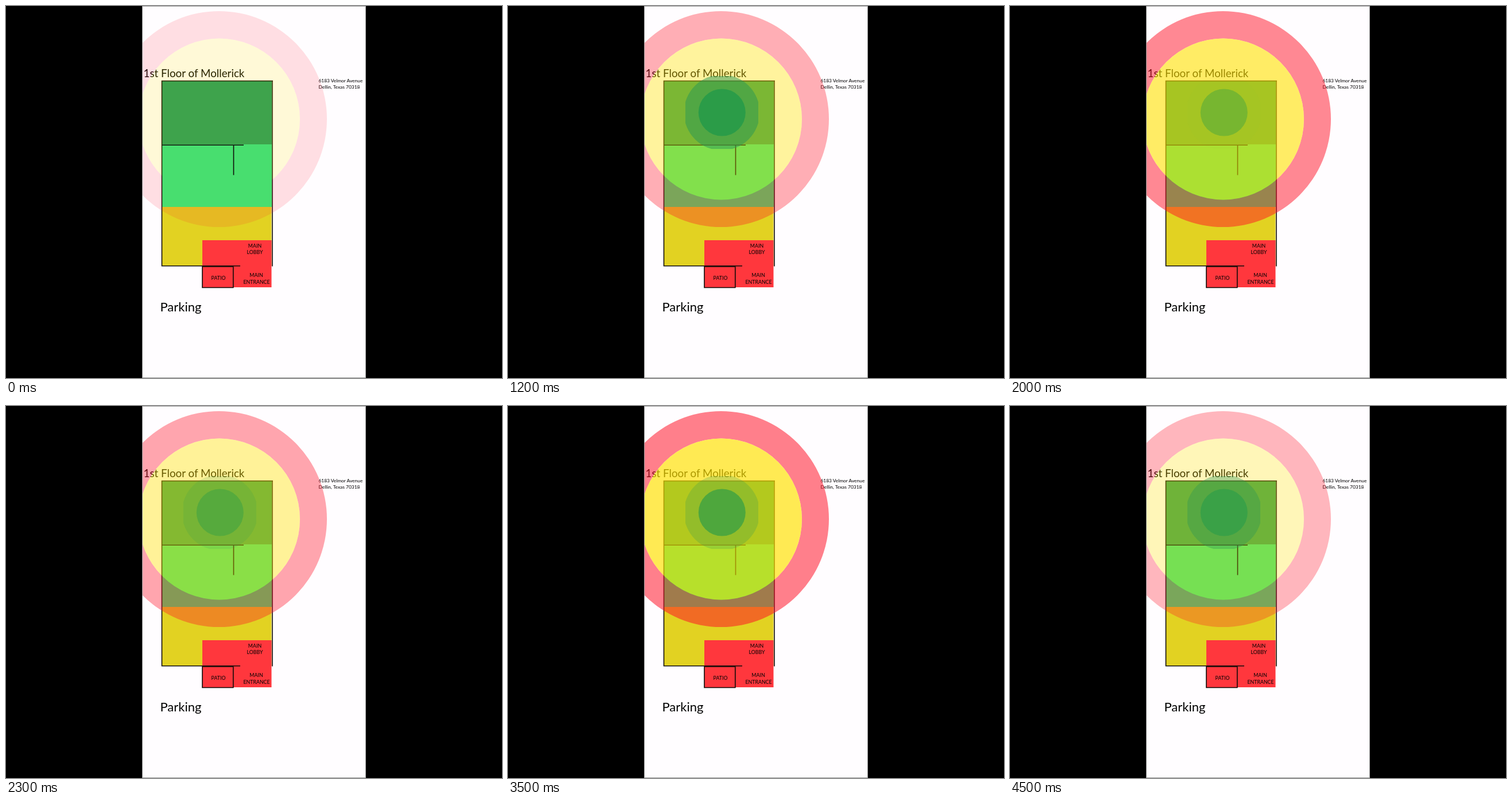
Animation, 864 px wide and 648 px high, one loop 4600 ms. Source, as an HTML page:

```html
<!DOCTYPE html>
<html lang="en">
<head>
<meta charset="utf-8">
<title>Floor plan signal</title>
<style>
  html, body { margin: 0; width: 100%; height: 100%; overflow: hidden; background: #000; }
  svg { display: block; width: 864px; height: 648px; }
  text { font-family: Lato, "Open Sans", sans-serif; fill: #000; }
  .label { font-size: 8.8px; text-anchor: middle; }
  .address { font-size: 8.4px; }
  .walls { fill: none; stroke: #100b08; stroke-width: 1.6; }
</style>
</head>
<body>
<svg viewBox="0 0 864 648">
  <defs>
    <clipPath id="floorArea"><path d="M272 131H463V350H272Z"/></clipPath>
    <clipPath id="outerArea"><path clip-rule="evenodd" d="M238 1H626V647H238Z M272 131H463V350H272Z"/></clipPath>
    <clipPath id="haloArea"><path d="M309 122H436V249H309Z"/></clipPath>
    <path id="ring" fill="#ff1226" fill-rule="evenodd"
      d="M183 197a188 188 0 0 1 376 0a188 188 0 0 1 -376 0Z M231 197a140.5 140.5 0 0 1 281 0a140.5 140.5 0 0 1 -281 0Z"/>
    <circle id="disc" cx="371.5" cy="197" r="140.5" fill="#ffe100"/>
  </defs>

  <path d="M237 0H627V648H237Z" fill="#999"/>
  <path d="M238 1H626V647H238Z" fill="#fffdff"/>

  <path d="M272 131H463V241H272Z" fill="#3ea34c"/>
  <path d="M272 241H463V350H272Z" fill="#48de6f"/>
  <path d="M272 350H462.5V453H272Z" fill="#e2d222"/>
  <path d="M342 408H462.5V490H342Z" fill="#ff373d"/>

  <g class="walls">
    <path d="M408 452.8H271.5V130.5H465M464 130.5V453.5M271.5 242.3H414M396.5 242V294.5"/>
    <path d="M342 454H395.8V490.5H342Z"/>
  </g>

  <text x="239.5" y="123.7" font-size="18.8">1st Floor of Mollerick</text>
  <text x="268.5" y="531.5" font-size="22">Parking</text>
  <text class="address" x="544.5" y="133">6183 Velmor Avenue</text>
  <text class="address" x="544.5" y="144">Dellin, Texas 70318</text>
  <text class="label" x="433.5" y="420.5">MAIN</text>
  <text class="label" x="433.5" y="432">LOBBY</text>
  <text class="label" x="370" y="477.3">PATIO</text>
  <text class="label" x="436" y="472">MAIN</text>
  <text class="label" x="436.5" y="483.7">ENTRANCE</text>

  <g clip-path="url(#outerArea)">
    <use href="#ring" id="ringOut"/>
    <use href="#disc" id="discOut"/>
  </g>
  <g clip-path="url(#floorArea)">
    <use href="#ring" id="ringIn"/>
    <use href="#disc" id="discIn"/>
  </g>
  <g clip-path="url(#haloArea)">
    <circle id="halo" cx="372.5" cy="185.5" r="66" fill="#289655"/>
  </g>
  <circle id="core" cx="372.8" cy="185.5" r="41" fill="#1c984b"/>
</svg>
<script>
  const LOOP = 4600, STEP = 100, PERIOD = 1950;

  // Opacity swings around a mean, highest at the peak time
  const pulse = (t, mean, swing, peak) =>
    mean + swing * Math.cos(2 * Math.PI * (t - peak) / PERIOD);

  // Linear fade-in at the start of the loop
  const rise = (t, length, from = 0) => Math.min(1, from + (1 - from) * t / length);

  function fade(id, opacity) {
    document.getElementById(id).setAttribute("opacity", opacity);
  }

  function draw(t) {
    const ring = pulse(t, .42, .13, 1700);
    const disc = pulse(t, .48, .22, 1700);
    const outer = rise(t, 1600, .25);
    const floor = rise(t, 1600) * .9;
    const centre = rise(t, 600);

    fade("ringOut", ring * outer);
    fade("discOut", disc * outer);
    fade("ringIn", ring * floor);
    fade("discIn", disc * floor);
    fade("halo", pulse(t, .28, .27, 1000) * centre);
    fade("core", pulse(t, .52, .2, 1150) * centre);
  }

  const start = performance.now();
  function tick() {
    const t = (performance.now() - start) % LOOP;
    draw(Math.floor(t / STEP) * STEP);
    requestAnimationFrame(tick);
  }
  tick();
</script>
</body>
</html>
```
